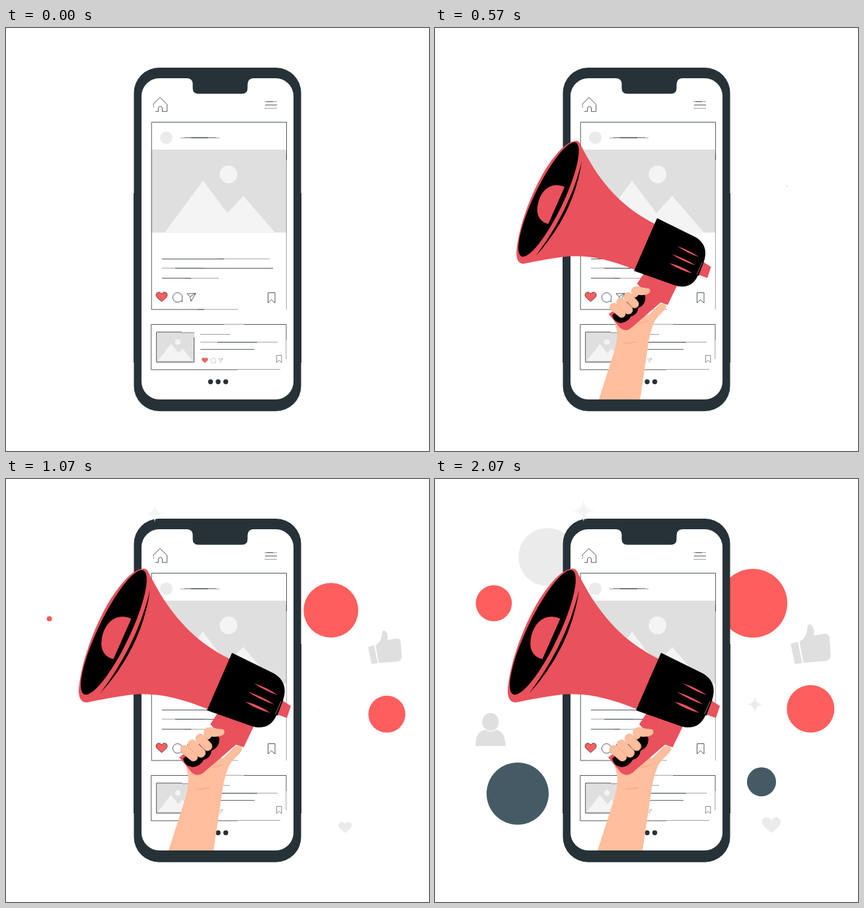
Recreate the animation shown at these times as an HTML page. Size 640 by 640 pixels, loop 3070 ms.

```html
<!DOCTYPE html>
<html lang="en">
<head>
<meta charset="utf-8">
<title>Social media campaign</title>
<style>
  html, body { margin: 0; width: 100%; height: 100%; overflow: hidden; background: #fff; }
  svg { display: block; width: 100%; height: 100%; }
  .coral { fill: #ff5e5e; }
  .slate { fill: #455a64; }
  .dark { fill: #263238; }
  .grey { fill: #dfdfdf; }
  .light { fill: #ebebeb; }
  .pale { fill: #f4f4f4; }
  .red { fill: #e9515c; }
  .skin { fill: #ffbe9d; }
  .line { fill: none; stroke: #263238; stroke-width: .8; }
  .thin { fill: none; stroke: #263238; stroke-width: .45; }
  .crease { fill: none; stroke: #eb9a7a; stroke-width: .8; }
</style>
</head>
<body>
<svg viewBox="0 0 640 640">
  <defs>
    <path id="heart" d="M0 7 C-3 4 -8.500 1 -8.500 -3 C-8.500 -8 -2 -9 0 -4.500 C2 -9 8.500 -8 8.500 -3 C8.500 1 3 4 0 7Z"/>
    <path id="sparkle" d="M0 -17 C2 -5 5 -2 17 0 C5 2 2 5 0 17 C-2 5 -5 2 -17 0 C-5 -2 -2 -5 0 -17Z"/>
    <path id="mountains" d="M240 309.500 L298 231 L335 280 L359 254 L407 309.500Z"/>
    <g id="actions">
      <use href="#heart" class="coral" x="235.500" y="407"/>
      <path d="M264.500 413 A7.200 7.200 0 1 1 266 411 L266.500 414.500Z"/>
      <path d="M274 402 L287 401.500 L280 413.500 L278.500 406.500Z M278.500 406.500 L287 401.500"/>
    </g>
    <path id="bookmark" d="M396.500 400.500 H407 V416 L401.500 411 L396.500 416Z"/>
  </defs>

  <!-- badges behind the phone -->
  <g data-pop=".77 .9 213.500 161.500"><circle class="light" cx="170" cy="118" r="43.800"/></g>
  <g data-pop=".43 1.020 533 240"><circle class="coral" cx="481" cy="188" r="52"/></g>

  <!-- phone -->
  <rect class="dark" x="193.500" y="60" width="253" height="519.700" rx="38"/>
  <path class="dark" d="M193 250 H447 V506 H193Z"/>
  <path fill="#fff" d="M232 76 H274 Q282 76.500 282.500 84 V91 Q282.500 99.500 291 99.500 H357 Q365.500 99.500 365.500 91 V85 Q366 76.500 374 76 H408 A27 27 0 0 1 435 103 V535 A27 27 0 0 1 408 562 H232 A27 27 0 0 1 205 535 V103 A27 27 0 0 1 232 76Z"/>

  <!-- top bar -->
  <path class="line" d="M222.500 115.500 L233 105.200 L243.700 115.500 V126.300 H236.500 V121 Q236 118.500 233.500 118.500 Q230.500 118.500 230.500 122 V126.300 H226"/>
  <path class="thin" d="M223.500 115 V121 M391 111.500 H410 M391 121.500 H410"/>
  <path class="line" d="M392 116.500 H410 M394 111.500 H404"/>

  <!-- large post -->
  <circle class="light" cx="242.500" cy="166" r="9.500"/>
  <path class="thin" d="M264 166.300 H323 M270 165.500 H318"/>
  <path class="line" d="M280 166 H306"/>
  <path class="grey" d="M220 184 H424.500 V309.500 H220Z"/>
  <use href="#mountains" class="pale"/>
  <circle class="pale" cx="336.700" cy="221.500" r="13.400"/>
  <path class="line" d="M220.200 426 V142.500 H424.500 V200 M220 425.900 H300 M236 349.500 H330 M256 363.500 H404 M236 378.500 H280"/>
  <path class="thin" d="M424.300 190 V426 M290 425.800 H351 M320 349.300 H399 M236 363.300 H300 M270 378.700 H322"/>
  <use href="#actions" class="line"/>
  <use href="#bookmark" class="line"/>

  <!-- small post -->
  <path class="grey" d="M228 460 H285 V505.500 H228Z"/>
  <path class="pale" d="M230 503 L249.500 478 L261 492 L267 485 L282 503Z"/>
  <circle class="pale" cx="260" cy="475" r="4.300"/>
  <path class="line" d="M227.600 460 V505.500 H284.500 V468 M228 460 H266 M219.700 517 V448.500 H330 M219.700 517 H350 M360 448.500 H424 V472 M320 475.500 H380 M294 486.300 H376"/>
  <path class="thin" d="M266 461 H285 M330 448.300 H360 M423.800 472 V501 M350 516.500 H415 M294 463.500 H339 M294 475.300 H411"/>
  <g class="thin">
    <use href="#actions" transform="translate(176.500 288) scale(.528)"/>
    <use href="#bookmark" transform="translate(130 217) scale(.705 .695)" stroke-width=".8"/>
  </g>
  <g class="dark">
    <circle cx="309.500" cy="535.300" r="3.700"/><circle cx="321" cy="535.300" r="3.700"/><circle cx="332.500" cy="535.300" r="3.700"/>
  </g>

  <!-- floating icons -->
  <g data-pop=".47 1 225 65"><use href="#sparkle" class="pale" x="225" y="48"/></g>
  <g data-pop=".8 .9 472 353"><use href="#sparkle" class="light" transform="translate(484 341) scale(.72)"/></g>
  <g data-pop=".44 1.020 604.300 384"><circle class="coral" cx="568.300" cy="347.800" r="36"/></g>
  <g data-pop=".4 1.020 599 280" class="grey">
    <path d="M538 249 L549 246.500 L555.500 278.500 L544.500 280Z"/>
    <path d="M551.500 246 Q564 239 563.500 222 Q566 217.500 570.500 222 Q575 227 572.500 237 L590 234 Q597 234 597 242 L598.700 266 Q598.500 274 591 275.500 L557.500 278Z"/>
  </g>
  <g data-pop=".49 1 523 536"><use href="#heart" class="light" transform="translate(509 524) scale(1.650)"/></g>
  <g data-pop=".775 .9 61.700 215.300"><circle class="coral" cx="89" cy="188" r="27.300"/></g>
  <g data-pop="1.160 .9 84 404" class="grey">
    <ellipse cx="84" cy="367.500" rx="12.500" ry="13.500"/>
    <path d="M61.300 404 C61.500 388 67 381 75.500 379.500 Q84 385 92.500 379.500 C101 381 106.500 388 106.800 404Z"/>
  </g>
  <g data-pop="1.170 .9 125 523"><circle class="slate" cx="125" cy="476" r="47"/></g>
  <g data-pop="1.155 .9 494 480"><circle class="slate" cx="494" cy="458.200" r="22"/></g>

  <!-- hand with megaphone -->
  <g id="megaphone">
    <path class="skin" d="M246 562 L271 484 Q278 460 275 446 L270 425 L300 410 L328 423 L346 405 Q356 402 357.500 409 C354 417 342 424 337 435 Q329 455 327 474 L314 562Z"/>
    <path class="red" d="M323 350 L309 371 L319 382 L262 421 L281 444 Q289 451 298 445 L348 402 L359.500 406 L376 372Z"/>
    <path class="crease" d="M288 469.500 Q298 469 308 467 M311 436.500 Q319 435 327 432"/>
    <path d="M302 392 L318 387 Q325 390 322 400 Q319 408 311 411 Q310 422 299 425 Q294 435 282 436 Q270 434 268 423Z"/>
    <g class="skin">
      <path d="M301 390 Q296 383 303 376.500 Q310 374 318 377.500 L329 379 Q333 384 327 388 Q318 391 311 389.500 Q309 394 304 394Z"/>
      <g stroke="#eb9a7a" stroke-width=".5">
        <rect x="-15" y="-6.500" width="30" height="13" rx="6.500" transform="translate(277 415) rotate(40)"/>
        <rect x="-16" y="-7" width="32" height="14" rx="7" transform="translate(288.500 408) rotate(45)"/>
        <rect x="-15" y="-6.800" width="30" height="13.600" rx="6.800" transform="translate(299.500 398.500) rotate(47)"/>
      </g>
    </g>

    <path class="red" d="M205 136 Q212 134 215 140 C242 194 276 242 340 273 L305 348 C260 330 225 322 185 327 Q150 332 123 338 Q111 339 110 322 C111 288 130 228 158 182 Q186 139 205 136Z"/>
    <ellipse rx="24" ry="104" transform="translate(163 232) rotate(25.600)"/>
    <path class="red" d="M189.500 211.500 L162.500 272.500 C150 270 143 259 144.500 246 C147 218 167 201 189.500 211.500Z"/>
    <path d="M218 168 Q205 256 142 325 Q199 249 218 168Z"/>

    <path d="M342 263 L405 294 C421 303 425 318 419 335 L409 358 C402 374 388 379 372 374 L304 350Z"/>
    <path d="M416.500 334 L420 336 L411 358 L406 356Z"/>
    <path class="red" d="M419 335.500 L431 343.500 L425 361.500 L411 356.500Z"/>
    <path class="red" d="M375 309 Q396 316 411 327 Q393 321 375 309Z M366 322 Q388 329 406 341 Q386 335 366 322Z M362 337 Q382 341 400 354 Q380 349 362 337Z"/>
    <path d="M416.500 336 L407.500 356" stroke="#fff" stroke-width=".5"/>
  </g>
</svg>
<script>
  const LOOP = 3070, FPS = 14, LAST_STEP = 29;
  const megaphone = document.getElementById('megaphone');
  const pops = [...document.querySelectorAll('[data-pop]')].map(el => {
    const [start, length, x, y] = el.dataset.pop.split(' ').map(Number);
    return { el, start, length, x, y };
  });

  const clamp = v => Math.min(1, Math.max(0, v));
  const easeInOut = p => p < .5 ? 4 * p ** 3 : 1 - 4 * (1 - p) ** 3;

  const bezier = (x1, y1, x2, y2) => {
    const at = (a, b, u) => 3 * u * (1 - u) ** 2 * a + 3 * u * u * (1 - u) * b + u ** 3;
    return p => {
      if (p <= 0 || p >= 1) return clamp(p);
      let low = 0, high = 1;
      for (let i = 0; i < 24; i++) {
        const mid = (low + high) / 2;
        if (at(x1, x2, mid) < p) low = mid; else high = mid;
      }
      return at(y1, y2, low);
    };
  };
  const overshoot = bezier(.62, 0, .23, 1.27);

  function scaleAbout(el, x, y, s) {
    el.setAttribute('visibility', s > 0 ? 'visible' : 'hidden');
    el.setAttribute('transform', `translate(${x} ${y}) scale(${s}) translate(${-x} ${-y})`);
  }

  // Motion is held at 14 poses a second, then rests until the loop restarts.
  function draw(now) {
    const step = Math.min(LAST_STEP, Math.floor((now % LOOP + 5) * FPS / 1000));
    const t = step / FPS;
    scaleAbout(megaphone, 269.5, 562, overshoot(clamp(t)));
    for (const { el, start, length, x, y } of pops)
      scaleAbout(el, x, y, easeInOut(clamp((t - start) / length)));
  }

  function tick() {
    draw(performance.now());
    requestAnimationFrame(tick);
  }
  tick();
</script>
</body>
</html>
```
